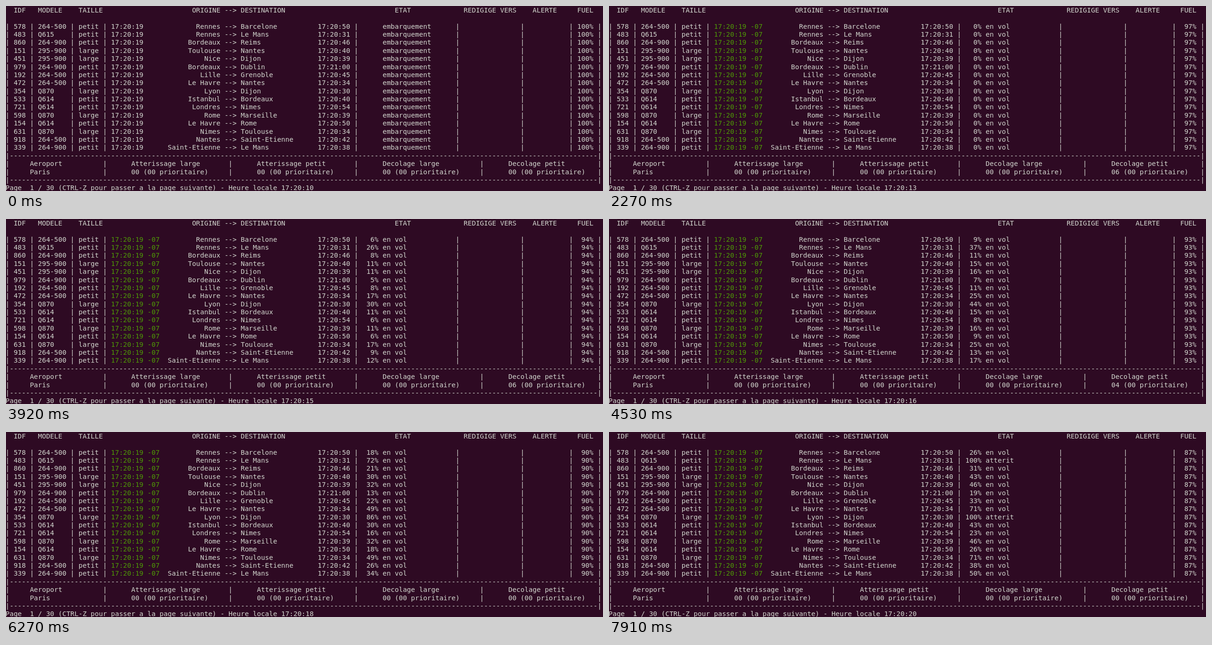
An HTML page with a canvas that plays this animation: 1280 by 398 pixels, repeating every 8 s.

```html
<!DOCTYPE html>
<html lang="fr">
<head>
<meta charset="utf-8">
<title>Vols</title>
<style>
  html, body { margin: 0; height: 100%; overflow: hidden; background: #2e0a23; }
  canvas { display: block; }
</style>
</head>
<body>
<canvas id="screen" width="1280" height="398"></canvas>
<script>
const ctx = document.getElementById('screen').getContext('2d');
const CELL = 8.693, LINE = 17.387, LOOP = 8000, REFRESH = 80;
const BG = '#2e0a23', FG = '#d3d7cf', GREEN = '#4e9a06';
const DEPARTURE = 1040, CRUISE = 1480;

// id, model, size, origin, destination, arrival
const flights = `578,264-500,petit,Rennes,Barcelone,17:20:50
483,Q615,petit,Rennes,Le Mans,17:20:31
860,264-900,petit,Bordeaux,Reims,17:20:46
151,295-900,large,Toulouse,Nantes,17:20:40
451,295-900,large,Nice,Dijon,17:20:39
979,264-900,petit,Bordeaux,Dublin,17:21:00
192,264-500,petit,Lille,Grenoble,17:20:45
472,264-500,petit,Le Havre,Nantes,17:20:34
354,Q870,large,Lyon,Dijon,17:20:30
533,Q614,petit,Istanbul,Bordeaux,17:20:40
721,Q614,petit,Londres,Nimes,17:20:54
598,Q870,large,Rome,Marseille,17:20:39
154,Q614,petit,Le Havre,Rome,17:20:50
631,Q870,large,Nimes,Toulouse,17:20:34
918,264-500,petit,Nantes,Saint-Etienne,17:20:42
339,264-900,petit,Saint-Etienne,Le Mans,17:20:38`.split('\n').map(line => line.split(','));

// Every character sits in its own terminal cell
function put(row, col, text, color = FG) {
  ctx.fillStyle = color;
  [...text].forEach((ch, i) => {
    if (ch !== ' ') ctx.fillText(ch, (col + i) * CELL - 1, row * LINE + 13.8);
  });
}

const bars = (row, cols) => cols.forEach(col => put(row, col, '|'));

// Earlier arrivals fly faster, all at constant speed
function flown(t, arrival) {
  const [, minutes, seconds] = arrival.split(':').map(Number);
  const duration = (minutes - 20) * 60 + seconds - 24.7;
  const percent = 660 / duration * (t - 2650) / 5190;
  return Math.round(Math.min(100, Math.max(0, percent)));
}

function state(t, arrival) {
  if (t < DEPARTURE) return '     embarquement';
  if (t < CRUISE) return '     decole';
  const percent = flown(t, arrival);
  return `${percent}%`.padStart(4) + (percent < 100 ? ' en vol' : ' atterit');
}

function drawFlights(t) {
  put(0, 2, 'IDF   MODELE    TAILLE');
  put(0, 46, 'ORIGINE --> DESTINATION');
  put(0, 96, 'ETAT');
  put(0, 113, 'REDIGIGE VERS    ALERTE     FUEL');

  const gone = t >= DEPARTURE;
  const fuel = 100 - Math.max(0, Math.floor((t - 560) / 555));
  flights.forEach(([id, model, size, from, to, arrival], i) => {
    const row = i + 2;
    bars(row, [0, 6, 16, 24, 86, 111, 127, 139, 146]);
    put(row, 2, id);
    put(row, 8, model);
    put(row, 18, size);
    put(row, 26, gone ? '17:20:19 -07' : '17:20:19', gone ? GREEN : FG);
    put(row, 40, from.padStart(13) + ' --> ' + to);
    put(row, 77, arrival);
    put(row, 88, state(t, arrival));
    put(row, 141, `${fuel}%`.padStart(4));
  });
}

function drawAirport(t) {
  const rule = '|' + '-'.repeat(145) + '|';
  put(18, 0, rule);
  put(21, 0, rule);
  for (const row of [19, 20]) bars(row, [0, 24, 55, 86, 117, 146]);
  put(19, 6, 'Aeroport');
  put(20, 6, 'Paris');

  // The take-off queue fills at once, then empties plane by plane
  const queue = t < CRUISE ? 0 : Math.max(0, Math.min(6, Math.ceil((5300 - t) / 230)));
  ['Atterissage large', 'Atterissage petit', 'Decolage large', 'Decolage petit'].forEach((title, i) => {
    put(19, 31 + 31 * i, title);
    put(20, 31 + 31 * i, `0${i === 3 ? queue : 0} (00 prioritaire)`);
  });

  const seconds = 11 + Math.floor((t - 160) / 815);
  put(22, 0, `Page  1 / 30 (CTRL-Z pour passer a la page suivante) - Heure locale 17:20:${seconds}`);
}

function draw(t) {
  ctx.fillStyle = BG;
  ctx.fillRect(0, 0, 1280, 398);
  ctx.font = '14.44px "DejaVu Sans Mono", monospace';
  drawFlights(t);
  drawAirport(t);
}

let shown = -1;
function tick() {
  const t = Math.floor(performance.now() % LOOP / REFRESH) * REFRESH;
  if (t !== shown) draw(shown = t);
  requestAnimationFrame(tick);
}
tick();
</script>
</body>
</html>
```
